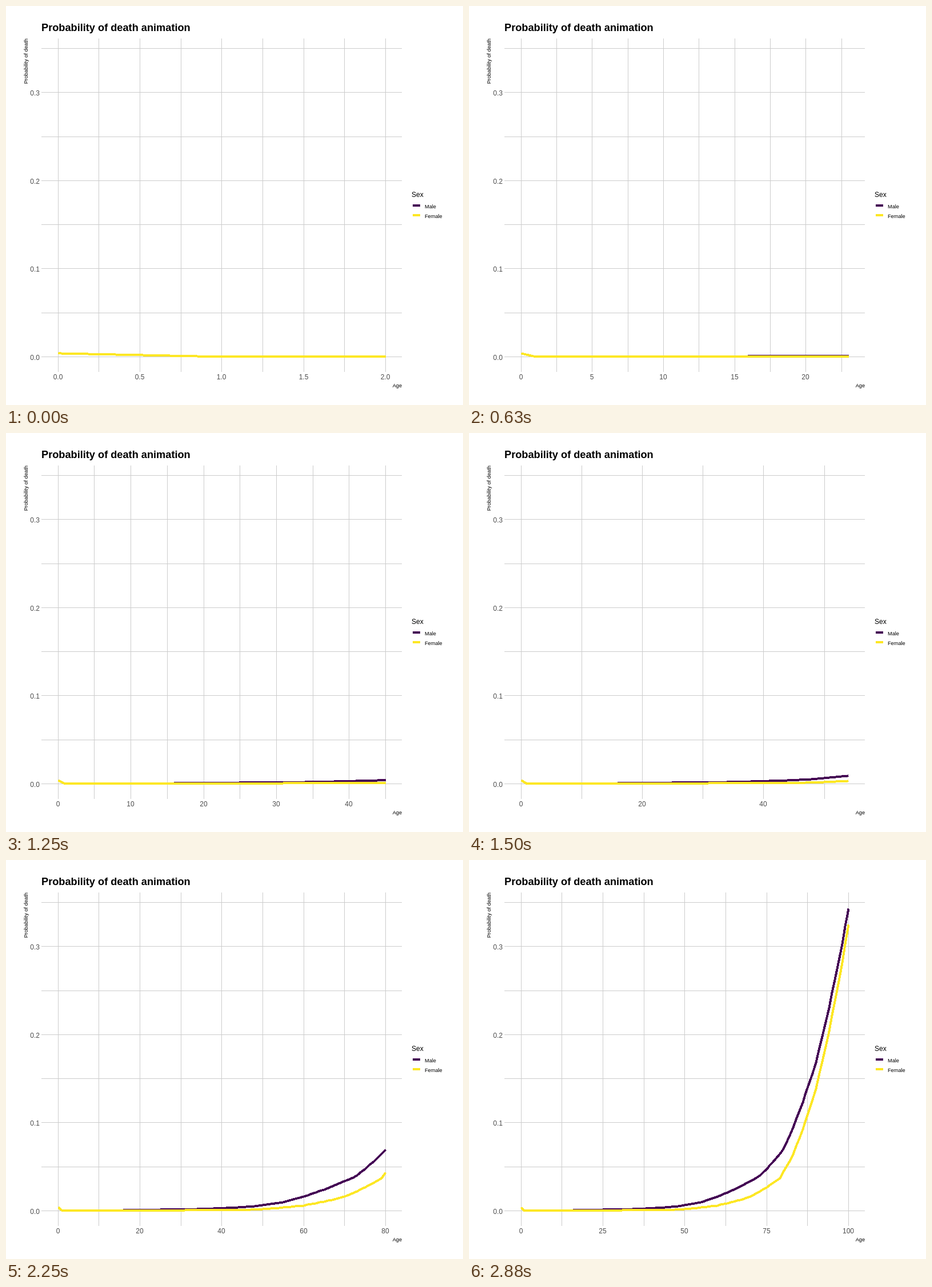
These frames come from a looping animation (800x700 px, 3000 ms). An HTML page:

```html
<!DOCTYPE html>
<html lang="en">
<head>
<meta charset="utf-8">
<title>Probability of death animation</title>
<style>
  html, body { margin: 0; width: 100%; height: 100%; overflow: hidden; background: #fff; }
  svg { display: block; font-family: Arial, "Liberation Sans", sans-serif; font-size: 9.2px; }
  .grid { stroke: #ccc; stroke-width: 1; fill: none; shape-rendering: crispEdges; }
  .line { stroke-width: 4; stroke-linejoin: round; fill: none; shape-rendering: crispEdges; }
  .male { stroke: #440154; }
  .female { stroke: #fde725; }
  .tick { font-size: 12px; fill: #4d4d4d; }
</style>
</head>
<body>
<svg width="800" height="700" viewBox="0 0 800 700">
  <path id="rows" class="grid"/>
  <path id="cols" class="grid"/>
  <path id="male" class="line male"/>
  <path id="female" class="line female"/>
  <g id="yTicks" class="tick" text-anchor="end"></g>
  <g id="xTicks" class="tick" text-anchor="middle"></g>
  <text x="62" y="44" font-size="18.2" font-weight="bold">Probability of death animation</text>
  <text transform="translate(38 57) rotate(-90)" text-anchor="end" font-size="9.3">Probability of death</text>
  <text x="693" y="669" text-anchor="end">Age</text>
  <text x="710" y="335" font-size="12">Sex</text>
  <path class="line male" d="M712 350H725"/>
  <path class="line female" d="M712 367H725"/>
  <text x="733" y="355">Male</text>
  <text x="733" y="372">Female</text>
</svg>
<script>
const LOOP = 3000, FRAMES = 24;
const LEFT = 62, RIGHT = 693, TOP = 57, BOTTOM = 642;
const X0 = 90.7, WIDTH = 573.3, Y0 = 614.95, PER_UNIT = 1545.4;

// Key ages and deaths per thousand; the square root runs straight between them
const male = [[0, 3.9], [1, 0], [16, .32], [25, .95], [34, 1.6], [45, 3.9], [54, 8.8],
  [73, 40], [80, 69], [90, 168], [100, 343]];
const female = [[0, 3.9], [1, 0], [31, .3], [47, .95], [60, 6], [70, 16], [79, 37],
  [83, 64], [90, 138.5], [100, 325]];

const $ = id => document.getElementById(id);
const px = v => Math.round(v) + .5;
const yAt = p => px(Y0 - PER_UNIT * p);
const xAt = (age, max) => px(X0 + WIDTH * age / max);
const label = (x, y, s) => `<text x="${x}" y="${y}">${s}</text>`;

function rate(keys, age) {
  const k = Math.max(1, keys.findIndex(p => p[0] >= age));
  const [a, p] = keys[k - 1], [b, q] = keys[k];
  const u = (age - a) / (b - a);
  return (Math.sqrt(p) * (1 - u) + Math.sqrt(q) * u) ** 2 / 1000;
}

function curve(keys, max) {
  const pts = [];
  // The small lift keeps line edges off pixel centres
  for (let age = 0; age <= max; age++) pts.push(xAt(age, max) + " " + (yAt(rate(keys, age)) - .1));
  return "M" + pts.join("L");
}

// Nicest label distance: weighs round numbers, coverage and about five labels
function stepFor(max) {
  const pad = max * .05, top = max + pad, range = top + pad;
  const base = 10 ** (Math.floor(Math.log10(max)) - 1);
  let best = -Infinity, found = 1;
  for (const unit of [base, base * 10]) {
    [1, 5, 2, 2.5, 4, 3].forEach((nice, i) => {
      const step = nice * unit;
      for (const n of [Math.floor(top / step), Math.ceil(top / step)]) {
        const last = n * step;
        const cover = 1 - .5 * ((top - last) ** 2 + pad ** 2) / (range * .1) ** 2;
        const ratio = (Math.max(last, top) + pad) / step / 4;
        const score = .25 * (1 - i / 5) + .2 * cover + .5 * (2 - Math.max(ratio, 1 / ratio));
        if (n > 0 && score > best) { best = score; found = step; }
      }
    });
  }
  return found;
}

function drawRows() {
  let d = "", text = "";
  for (let k = 0; k <= 7; k++) {
    const y = yAt(k * .05);
    d += `M${LEFT} ${y}H${RIGHT}`;
    if (k % 2 === 0) text += label(59, y + 5, (k * .05).toFixed(1));
  }
  $("rows").setAttribute("d", d);
  $("yTicks").innerHTML = text;
}

function drawAge(max) {
  const step = stepFor(max), digits = step % 1 ? 1 : 0;
  let d = "", text = "";
  for (let k = 0; k * step / 2 <= max * 1.05; k++) {
    const age = k * step / 2, x = xAt(age, max);
    d += `M${x} ${TOP}V${BOTTOM}`;
    if (k % 2 === 0) text += label(x - .5, 655, age.toFixed(digits));
  }
  $("cols").setAttribute("d", d);
  $("xTicks").innerHTML = text;
  $("male").setAttribute("d", curve(male, max));
  $("female").setAttribute("d", curve(female, max));
}

// Steps of 125 ms, rounded to whole hundredths of a second
const startOf = i => Math.round(i * 12.5) * 10;
const ageAt = i => Math.min(100, Math.floor((i + .5) * 100 / (FRAMES - 1)));

const begin = performance.now();
let shown = -1;
function tick() {
  const t = (performance.now() - begin) % LOOP;
  let i = Math.floor(t / 125);
  if (startOf(i) > t) i--;
  if (i !== shown) drawAge(ageAt(shown = i));
  requestAnimationFrame(tick);
}

drawRows();
tick();
</script>
</body>
</html>
```
